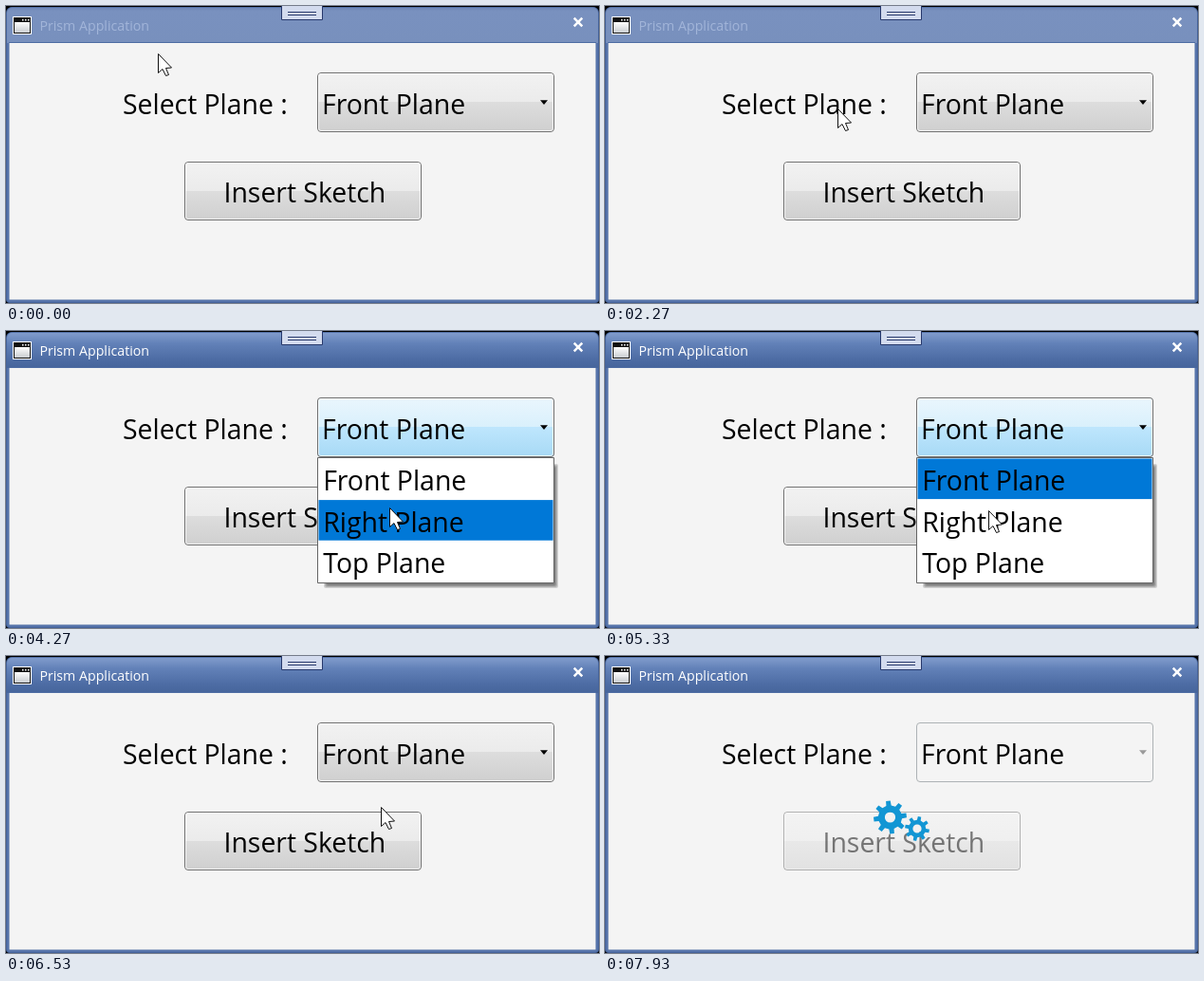
These frames come from a looping animation (625 px wide and 313 px high, 8 s). An HTML page with a canvas:

```html
<!DOCTYPE html>
<html lang="en">
<head>
<meta charset="utf-8">
<title>Prism Application</title>
<style>
html, body { margin: 0; width: 100%; height: 100%; overflow: hidden; background: #000; }
canvas { display: block; }
</style>
</head>
<body>
<canvas id="stage" width="625" height="313"></canvas>
<script>
const ctx = document.getElementById('stage').getContext('2d');
const LOOP = 8000, STEP = 1000 / 15;
const OPEN = 3466, LIT = 3599, CLOSE = 6532, BUSY = 7466;
const FONT = '"Open Sans", "Noto Sans", sans-serif';
const BIG = 28.4, ROW = 43.6;
const ITEMS = ['Front Plane', 'Right Plane', 'Top Plane'];

const GRAY = { stops: ['#f2f2f2', '#ebebeb', '#dddddd', '#cfcfcf'], edge: '#707070' };
const BLUE = { stops: ['#eaf6fd', '#d9f0fc', '#bee6fd', '#a7d9f5'], edge: '#3c7fb1' };

// Pointer moves: start, end, x, y to reach
const moves = [
  [0, 267, 125, 95],
  [267, 567, 342, 118],
  [567, 867, 274, 110],
  [867, 1067, 186, 125],
  [1067, 1600, 240, 128],
  [2733, 3333, 417, 105],
  [3867, 4267, 404, 186],
  [4267, 4667, 405, 254],
  [4800, 5133, 402, 146],
  [5133, 5600, 408, 254],
  [5867, 6100, 395, 171],
  [6200, 6267, 395, 168],
  [6467, 6533, 395, 159],
  [6533, 6967, 365, 217]
];

const clamp = v => Math.max(0, Math.min(1, v));
const ease = u => u * u * (3 - 2 * u);

function pointer(t) {
  let x = 160, y = 50;
  for (const [from, to, nx, ny] of moves) {
    const u = ease(clamp((t - from) / (to - from)));
    x += (nx - x) * u;
    y += (ny - y) * u;
  }
  // One circle around the label
  const a = 2 * Math.PI * ease(clamp((t - 1867) / 867));
  return [Math.round(x + 15 * Math.sin(a)), Math.round(y - 10.5 * (1 - Math.cos(a)))];
}

const fade = (t, on, off) =>
  clamp((Math.min(t, off) - on) / 220) * (1 - clamp((t - off) / 180));

function rect(x, y, w, h, color) {
  ctx.fillStyle = color;
  ctx.fillRect(x, y, w, h);
}

function box(x, y, w, h, r, fill, stroke) {
  ctx.beginPath();
  ctx.roundRect(x, y, w, h, r);
  if (fill) {
    ctx.fillStyle = fill;
    ctx.fill();
  }
  if (stroke) {
    ctx.lineWidth = 1;
    ctx.strokeStyle = stroke;
    ctx.stroke();
  }
}

function line(x1, y1, x2, y2, color, width) {
  ctx.strokeStyle = color;
  ctx.lineWidth = width;
  ctx.beginPath();
  ctx.moveTo(x1, y1);
  ctx.lineTo(x2, y2);
  ctx.stroke();
}

function text(str, x, y, size = BIG, color = '#000') {
  ctx.font = size + 'px ' + FONT;
  ctx.fillStyle = color;
  ctx.fillText(str, x, y);
}

function vertical(y0, y1, stops) {
  const g = ctx.createLinearGradient(0, y0, 0, y1);
  for (const [p, c] of stops) g.addColorStop(p, c);
  return g;
}

function chrome(x, y, w, h, skin, alpha = 1, edge = skin.edge) {
  if (alpha <= 0) return;
  const [a, b, c, d] = skin.stops;
  const fill = vertical(y, y + h, [[0, a], [.5, b], [.5, c], [1, d]]);
  ctx.save();
  ctx.globalAlpha *= alpha;
  box(x + .5, y + .5, w - 1, h - 1, 3.5, fill, edge);
  box(x + 1.5, y + 1.5, w - 3, h - 3, 2.5, null, 'rgba(255,255,255,.75)');
  ctx.restore();
}

function drawWindow(active) {
  rect(0, 0, 625, 313, '#000');
  box(0, 1, 625, 312, [6, 6, 4, 4], '#44629a');
  box(1, 1, 623, 311, [6, 6, 3, 3], '#5674ab');
  box(1, 2, 623, 37, [5, 5, 0, 0], vertical(2, 39, active
    ? [[0, '#819ccc'], [.3, '#6281b8'], [.75, '#4d6ca4'], [1, '#46659b']]
    : [[0, '#7189b8'], [.1, '#7991bf'], [1, '#7890bd']]));
  rect(3, 38, 619, 272, '#4d6ca3');
  rect(3.5, 39, 618, 270.5, '#f4f4f4');

  // Window icon
  rect(7, 11, 20, 19, '#fff');
  rect(8, 12, 18, 17, '#111');
  rect(9, 17, 16, 11, vertical(17, 28, [[0, '#ffffff'], [1, '#c9ccd0']]));
  for (let x = 17; x < 25; x += 3) rect(x, 14, 1.5, 1.5, '#fff');
  text('Prism Application', 35.4, 25.5, 14.2, active ? '#fff' : '#a2b5d9');

  // Grip at the top
  box(290.5, -.5, 43, 15, 0, '#d3dbee', '#27386b');
  for (const y of [6.5, 9.5]) line(297, y, 327, y, '#27386b', 1);

  for (const s of [-4.3, 4.3]) line(603 - s, 12.7, 603 + s, 21.3, '#fff', 2.5);
}

function drawCombo(t, y) {
  const busy = t >= BUSY, open = t >= OPEN && t < CLOSE;
  if (busy) {
    box(328.5, 70.5, 249, 62, 3.5, '#f4f4f4', '#adb2b5');
  } else {
    const hot = t >= CLOSE ? 0 : Math.max(fade(t, 450, 650), fade(t, 3000, CLOSE));
    chrome(328, 70, 250, 63, GRAY);
    chrome(328, 70, 250, 63, BLUE, hot, open && y > 132 ? GRAY.edge : BLUE.edge);
  }
  text(ITEMS[0], 333, 114);
  ctx.fillStyle = busy ? '#9a9a9a' : '#000';
  ctx.beginPath();
  ctx.moveTo(563, 99.3);
  ctx.lineTo(571, 99.3);
  ctx.lineTo(567, 104);
  ctx.fill();
}

function drawButton(t) {
  ctx.save();
  if (t >= BUSY) ctx.globalAlpha = .5;
  chrome(188, 164, 250, 62, GRAY);
  if (t < BUSY) chrome(188, 164, 250, 62, BLUE, fade(t, 6560, LOOP));
  text('Insert Sketch', 229.5, 207);
  ctx.restore();
}

function drawPopup(t) {
  for (let i = 0; i < 4; i++)
    box(335 + i, 140 + i, 247 - 2 * i, 131 - 2 * i, 2, 'rgba(0,0,0,.15)');
  box(328.5, 133.5, 249, 132, 0, '#fff', '#646464');
  if (t >= LIT) {
    // The highlight trails the pointer by one step
    const row = Math.floor((pointer(t - STEP)[1] - 134) / ROW);
    const top = 134 + ROW * Math.max(0, Math.min(2, row));
    rect(329.5, top + .5, 247, ROW - 1, '#0078d7');
  }
  ITEMS.forEach((name, i) => text(name, 334.2, 168 + i * ROW));
}

function gear(x, y, r, root, hole, angle) {
  const teeth = 8, pitch = 2 * Math.PI / teeth;
  ctx.beginPath();
  for (let i = 0; i < teeth; i++) {
    const a = angle + i * pitch - Math.PI / 2;
    for (const [d, rad] of [[-.27, root], [-.17, r], [.17, r], [.27, root]])
      ctx.lineTo(x + rad * Math.cos(a + d * pitch), y + rad * Math.sin(a + d * pitch));
  }
  ctx.closePath();
  ctx.moveTo(x + hole, y);
  ctx.arc(x, y, hole, 0, 2 * Math.PI);
  ctx.fillStyle = '#1296d4';
  ctx.fill('evenodd');
}

function drawCursor(x, y) {
  const pts = [[0, 0], [0, 20], [4.5, 16], [8, 23], [11, 22], [8, 15], [14, 14.5]];
  ctx.beginPath();
  for (const [dx, dy] of pts) ctx.lineTo(x + .5 + dx, y + .5 + dy);
  ctx.closePath();
  ctx.fillStyle = '#fff';
  ctx.fill();
  ctx.lineWidth = 1;
  ctx.strokeStyle = '#111';
  ctx.stroke();
}

function draw() {
  const now = performance.now() % LOOP;
  const t = Math.floor((now + 4) / STEP) * STEP % LOOP;
  const [x, y] = pointer(t);
  drawWindow(t >= OPEN);
  text('Select Plane :', 123, 114);
  drawCombo(t, y);
  drawButton(t);
  if (t >= OPEN && t < CLOSE) drawPopup(t);
  if (t >= BUSY) {
    const turn = (t - 7933) / 1000 * 1.6;
    gear(300.5, 170, 17.5, 12.6, 5.6, turn - .12);
    gear(329, 182, 13, 9.2, 4.6, .2 - turn);
  } else {
    drawCursor(x, y);
  }
  requestAnimationFrame(draw);
}
draw();
</script>
</body>
</html>
```
